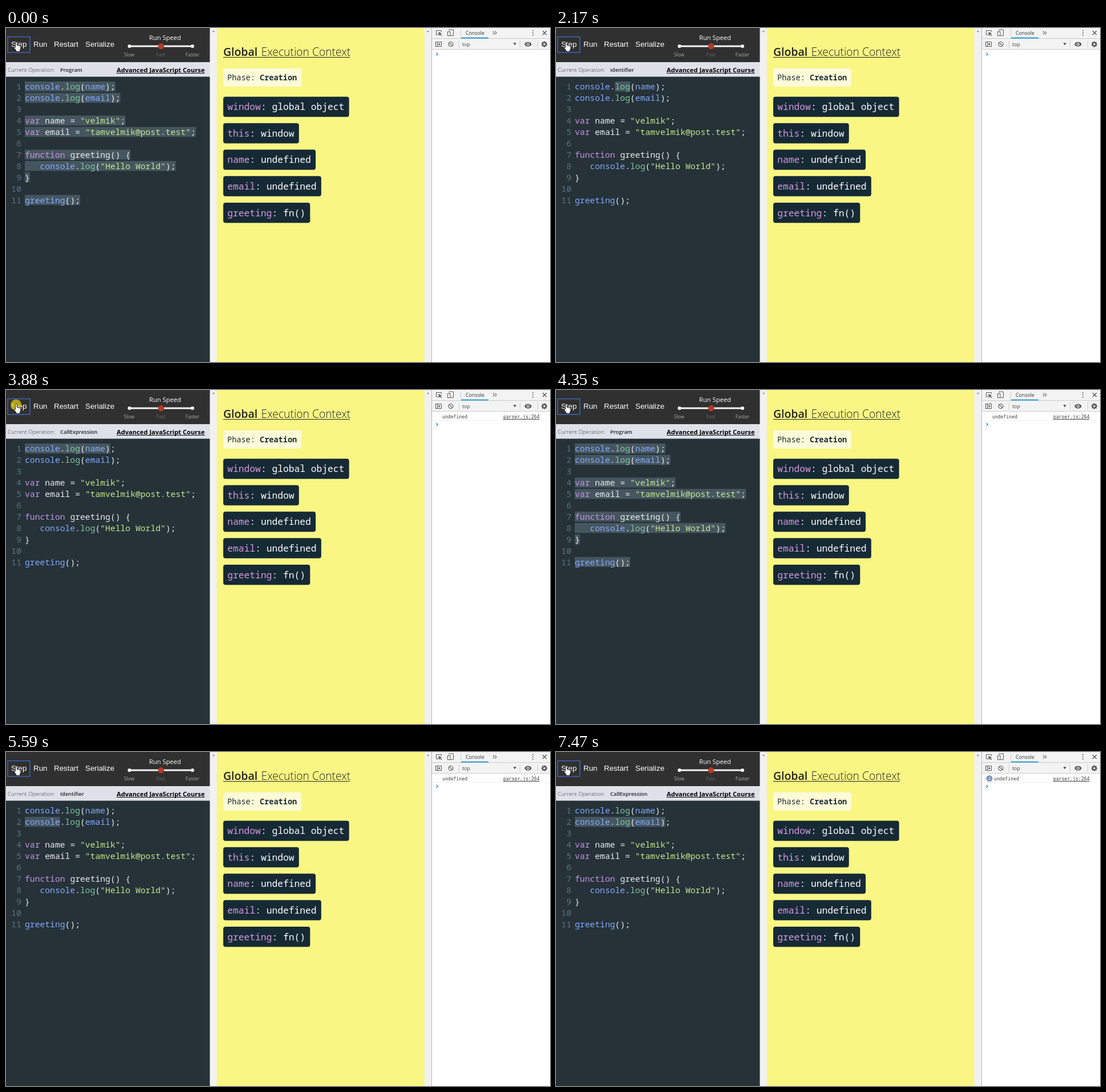
Recreate the animation shown at these times as an HTML page with a canvas. Size 954 by 587 pixels, loop 8 s.

```html
<!DOCTYPE html>
<html lang="en">
<head>
<meta charset="utf-8">
<title>Execution context stepper</title>
<style>
html, body { margin: 0; width: 100%; height: 100%; overflow: hidden; background: #fff; }
canvas { display: block; width: 954px; height: 587px; }
</style>
</head>
<body>
<canvas id="stage"></canvas>
<script>
const W = 954, H = 587, LOOP = 8000;
const canvas = document.getElementById('stage');
const ctx = canvas.getContext('2d');
const dpr = window.devicePixelRatio || 1;
canvas.width = W * dpr;
canvas.height = H * dpr;

const UI = '"Open Sans", "Noto Sans", sans-serif';
const ARIAL = '"Liberation Sans", Arial, sans-serif';
const MONO = '"Noto Sans Mono", "DejaVu Sans Mono", monospace';
const LOG = '"DejaVu Sans Mono", monospace';

const CODE = [
  'console.log(name);',
  'console.log(email);',
  '',
  'var name = "velmik";',
  'var email = "tamvelmik@post.test";',
  '',
  'function greeting() {',
  '   console.log("Hello World");',
  '}',
  '',
  'greeting();'
];
const CELL = 8.82, CODE_X = 33, LINE = 19.95;
const LEFT_W = 357.5;

const VARS = [
  ['window', 'global object'],
  ['this', 'window'],
  ['name', 'undefined'],
  ['email', 'undefined'],
  ['greeting', 'fn()']
];

// Each step: time, operation, line (-1 = whole program), first and last column,
// and the time its click marker appears (if one is seen).
const STEPS = [
  [0, 'Program', -1],
  [280, 'ExpressionStatement', 0, 0, 18, 150],
  [740, 'CallExpression', 0, 0, 17, 600],
  [1060, 'MemberExpression', 0, 0, 11],
  [1370, 'Identifier', 0, 0, 7],
  [1840, 'MemberExpression', 0, 0, 11, 1690],
  [2170, 'Identifier', 0, 8, 11, 2000],
  [2470, 'MemberExpression', 0, 0, 11, 2320],
  [2770, 'CallExpression', 0, 0, 17, 2620],
  [3080, 'Identifier', 0, 12, 16, 2930],
  [3400, 'CallExpression', 0, 0, 17, 3240],
  [3710, 'CallExpression', 0, 0, 17, 3550],
  [4030, 'ExpressionStatement', 0, 0, 18, 3880],
  [4340, 'Program', -1, 0, 0, 4190],
  [4650, 'ExpressionStatement', 1, 0, 19, 4500],
  [4970, 'CallExpression', 1, 0, 18, 4820],
  [5280, 'MemberExpression', 1, 0, 11],
  [5590, 'Identifier', 1, 0, 7, 5440],
  [5900, 'MemberExpression', 1, 0, 11, 5740],
  [6200, 'Identifier', 1, 8, 11, 6050],
  [6520, 'MemberExpression', 1, 0, 11, 6370],
  [6840, 'CallExpression', 1, 0, 18, 6680],
  [7160, 'Identifier', 1, 12, 17],
  [7470, 'CallExpression', 1, 0, 18, 7310]
].map(([at, op, line, from, to, click]) => ({ at, op, line, from, to, click }));
const LOG_TIMES = [3400, 7470];

function rect(x, y, w, h, color) {
  ctx.fillStyle = color;
  ctx.fillRect(x, y, w, h);
}

function box(x, y, w, h, r, color) {
  ctx.fillStyle = color;
  ctx.beginPath();
  ctx.roundRect(x, y, w, h, r);
  ctx.fill();
}

function disc(x, y, r, color) {
  ctx.fillStyle = color;
  ctx.beginPath();
  ctx.arc(x, y, r, 0, Math.PI * 2);
  ctx.fill();
}

function ring(x, y, r, color, width = 1) {
  ctx.strokeStyle = color;
  ctx.lineWidth = width;
  ctx.beginPath();
  ctx.arc(x, y, r, 0, Math.PI * 2);
  ctx.stroke();
}

// Points are x, y pairs.
function poly(points, color, { fill = false, width = 1 } = {}) {
  ctx.beginPath();
  for (let i = 0; i < points.length; i += 2) ctx.lineTo(points[i], points[i + 1]);
  if (fill) {
    ctx.fillStyle = color;
    ctx.fill();
  } else {
    ctx.strokeStyle = color;
    ctx.lineWidth = width;
    ctx.stroke();
  }
}

function text(str, x, y, font, color, align = 'left') {
  ctx.font = font;
  ctx.fillStyle = color;
  ctx.textAlign = align;
  ctx.fillText(str, x, y);
  return ctx.measureText(str).width;
}

function link(str, x, y, font, color) {
  const w = text(str, x, y, font, color);
  rect(x, Math.round(y + 1), w, 1, color);
}

function drawToolbar(dy) {
  rect(0, 0, LEFT_W, 60, '#303030');
  ctx.strokeStyle = '#3f68c4';
  ctx.lineWidth = 1.4;
  ctx.strokeRect(3, 15.5 + dy, 39, 27.5);
  [['Step', 9], ['Run', 48], ['Restart', 84], ['Serialize', 139]]
    .forEach(([s, x]) => text(s, x, 33 + dy, `13.33px ${ARIAL}`, '#fff'));

  text('Run Speed', 279, 21 + dy, `11.2px ${UI}`, '#fff', 'center');
  rect(216, 30.5 + dy, 111, 3, '#f4f4f4');
  disc(216.5, 32 + dy, 3, '#fff');
  disc(327, 32 + dy, 3, '#fff');
  disc(272, 32 + dy, 5.3, '#b53a2a');
  const small = `8.5px ${UI}`;
  text('Slow', 216, 49.5 + dy, small, '#a8a8a8', 'center');
  text('Fast', 271.5, 49.5 + dy, small, '#686868', 'center');
  text('Faster', 327, 49.5 + dy, small, '#a8a8a8', 'center');
}

function drawStatus(op, wrapped) {
  const label = `300 9.8px ${UI}`, name = `600 9.4px ${UI}`, course = `700 11.15px ${UI}`;
  const top = wrapped ? 53 : 60;
  rect(0, top, LEFT_W, 86 - top, '#dfe1e9');
  if (wrapped) {
    text('Current Operation:', 3, 66, label, '#333');
    text(op, 10, 80, name, '#222');
    link('Advanced JavaScript', 195, 66, course, '#000');
    link('Course', 195, 81, course, '#000');
  } else {
    text('Current Operation:', 3, 77, label, '#333');
    text(op, 95, 77, name, '#222');
    link('Advanced JavaScript Course', 194, 77.5, course, '#000');
  }
}

function select(line, from, to) {
  if (to > from) rect(CODE_X + from * CELL, 94 + line * LINE, (to - from) * CELL, 17.5, '#46565f');
}

function drawCode(step) {
  rect(0, 85.6, LEFT_W, H - 85.6, '#263238');
  if (step.line < 0) CODE.forEach((s, i) => select(i, 0, s.length));
  else select(step.line, step.from, step.to);

  const font = `300 14.7px ${MONO}`;
  CODE.forEach((s, i) => {
    const y = 108 + i * LINE;
    text(String(i + 1), 27, y, font, '#587480', 'right');
    let declared = false;
    for (const m of s.matchAll(/"[^"]*"|[a-z]+|\S/g)) {
      const t = m[0];
      let color = '#e9eded';
      if (t === 'var' || t === 'function') color = '#c792ea';
      else if (t === 'log') color = '#7ec4a0';
      else if (t[0] === '"') color = '#c3e88d';
      else if (/[a-z]/.test(t) && !declared) color = '#82aaff';
      declared = color === '#c792ea';
      text(t, CODE_X + m.index * CELL, y, font, color);
    }
  });
}

function drawContext() {
  rect(LEFT_W, 0, 747 - LEFT_W, H, '#f1f1f1');
  rect(369.7, 0, 364, H, '#f9f684');
  for (const x of [364, 740]) poly([x - 2.5, 7, x, 4, x + 2.5, 7], '#9a9a9a', { fill: true });

  text('Global', 381, 49, `600 19.4px ${UI}`, '#222');
  text('Execution Context', 447.5, 49, `300 19.3px ${UI}`, '#222');
  rect(381, 51, 222, 1, '#222');

  box(381, 71, 137, 32, 4, '#fdfbd8');
  text('Phase:', 388, 91.5, `13.58px ${MONO}`, '#1c2b33');
  text('Creation', 445, 91.5, `700 13.58px ${MONO}`, '#1c2b33');

  const font = `500 16.28px ${MONO}`, cell = 9.77;
  VARS.forEach(([key, value], i) => {
    const y = 120.7 + i * 46.55;
    box(381, y, (key.length + value.length + 2) * cell + 15.5, 35.5, 4, '#162a35');
    text(key, 388.3, y + 23.6, font, '#d797de');
    text(': ' + value, 388.3 + key.length * cell, y + 23.6, font, '#fff');
  });
}

function drawDevtools(logs) {
  const ink = '#5a5a5a', line = '#cccccc', ui = `8.8px ${UI}`, mono = `8.15px ${LOG}`;
  rect(747, 0, 207, H, '#fff');
  rect(747, 0, 207, 37, '#f3f3f3');
  rect(746, 0, 1, H, '#b4b4b4');
  rect(747, 18, 207, 1, line);
  rect(747, 37, 207, 1, line);

  // inspect and device icons
  poly([759, 12, 754.5, 12, 754.5, 4.5, 763.5, 4.5, 763.5, 7], ink);
  poly([758, 7, 764.5, 9.5, 762, 10.5, 764.5, 13, 763.5, 14, 761, 11.5, 760, 14], ink, { fill: true });
  poly([777, 5, 777, 3, 784.5, 3, 784.5, 13.5, 779.5, 13.5], ink);
  ctx.strokeRect(774.5, 6.5, 4.5, 7);
  rect(797, 3, 1, 12, line);
  text('Console', 806, 12, ui, '#333');
  rect(798, 16.5, 48, 2, '#2a9fd0');
  for (const x of [854, 857.5]) poly([x, 5.5, x + 2.5, 8.5, x, 11.5], ink, { width: 1.1 });
  for (const y of [4.5, 8.5, 12.5]) disc(924, y, 1, ink);
  poly([941, 5, 948, 12], ink, { width: 1.4 });
  poly([948, 5, 941, 12], ink, { width: 1.4 });

  // filter row
  ctx.strokeStyle = ink;
  ctx.lineWidth = 1;
  ctx.strokeRect(753.5, 24.5, 10, 8);
  rect(756, 24.5, 1, 8, ink);
  poly([758.5, 26, 762, 28.5, 758.5, 31], ink, { fill: true });
  ring(780, 28.5, 4, ink, 1.2);
  poly([777.2, 25.7, 782.8, 31.3], ink, { width: 1.2 });
  for (const x of [794, 901, 932]) rect(x, 22, 1, 13, line);
  text('top', 800, 31.5, ui, '#444');
  poly([889.5, 26, 895, 26, 892.2, 30.5], ink, { fill: true });
  ctx.fillStyle = ink;
  ctx.beginPath();
  ctx.ellipse(915.5, 28.5, 6, 4, 0, 0, Math.PI * 2);
  ctx.fill();
  disc(915.5, 28.5, 2.6, '#f3f3f3');
  disc(915.5, 28.5, 1.5, ink);
  for (let i = 0; i < 4; i++) {
    const a = i * Math.PI / 4, dx = Math.cos(a) * 5.3, dy = Math.sin(a) * 5.3;
    poly([944 - dx, 28.5 - dy, 944 + dx, 28.5 + dy], ink, { width: 2 });
  }
  disc(944, 28.5, 4, ink);
  disc(944, 28.5, 1.7, '#f3f3f3');

  let promptY = 46;
  if (logs) {
    const x = logs > 1 ? 768 : 765;
    if (logs > 1) {
      disc(760, 46.5, 5.5, '#7a96b8');
      text(String(logs), 760, 49.3, `8px ${UI}`, '#fff', 'center');
    }
    text('undefined', x, 49.5, mono, '#404040');
    link('parser.js:264', 872, 49.5, mono, '#404040');
    rect(747, 53, 207, 1, '#f0f0f0');
    promptY = 60.5;
  }
  poly([754.5, promptY - 2.5, 757.2, promptY, 754.5, promptY + 2.5], '#367cf1', { width: 1.3 });
}

function drawPointer(clicked) {
  if (clicked) disc(17.5, 26, 9.5, 'rgba(222, 200, 12, 0.75)');
  const hand = new Path2D(
    'M16.6 26.3 Q16.6 24.6 18 24.6 Q19.4 24.6 19.4 26.3 V30.6 ' +
    'Q20.9 29.8 21.8 31 Q23.2 30.4 24 31.7 Q25.8 31.4 25.8 33.3 ' +
    'V36.4 L24.4 39.2 V41.3 H17.8 V39.6 L14.2 34.8 Q14.2 32.6 16.6 34 Z');
  ctx.fillStyle = '#fff';
  ctx.fill(hand);
  ctx.strokeStyle = '#111';
  ctx.lineWidth = 0.9;
  ctx.stroke(hand);
}

function draw(t) {
  const step = STEPS.findLast(s => s.at <= t);
  const clicked = STEPS.some(s => s.click <= t && t < s.at);
  const wrapped = step.op === 'ExpressionStatement';
  ctx.setTransform(dpr, 0, 0, dpr, 0, 0);
  ctx.clearRect(0, 0, W, H);
  ctx.textBaseline = 'alphabetic';
  drawContext();
  drawToolbar(wrapped ? -4 : 0);
  drawStatus(step.op, wrapped);
  drawCode(step);
  drawDevtools(LOG_TIMES.filter(at => at <= t).length);
  drawPointer(clicked);
}

const start = performance.now();
function tick() {
  draw((performance.now() - start) % LOOP);
  requestAnimationFrame(tick);
}
tick();
</script>
</body>
</html>
```
